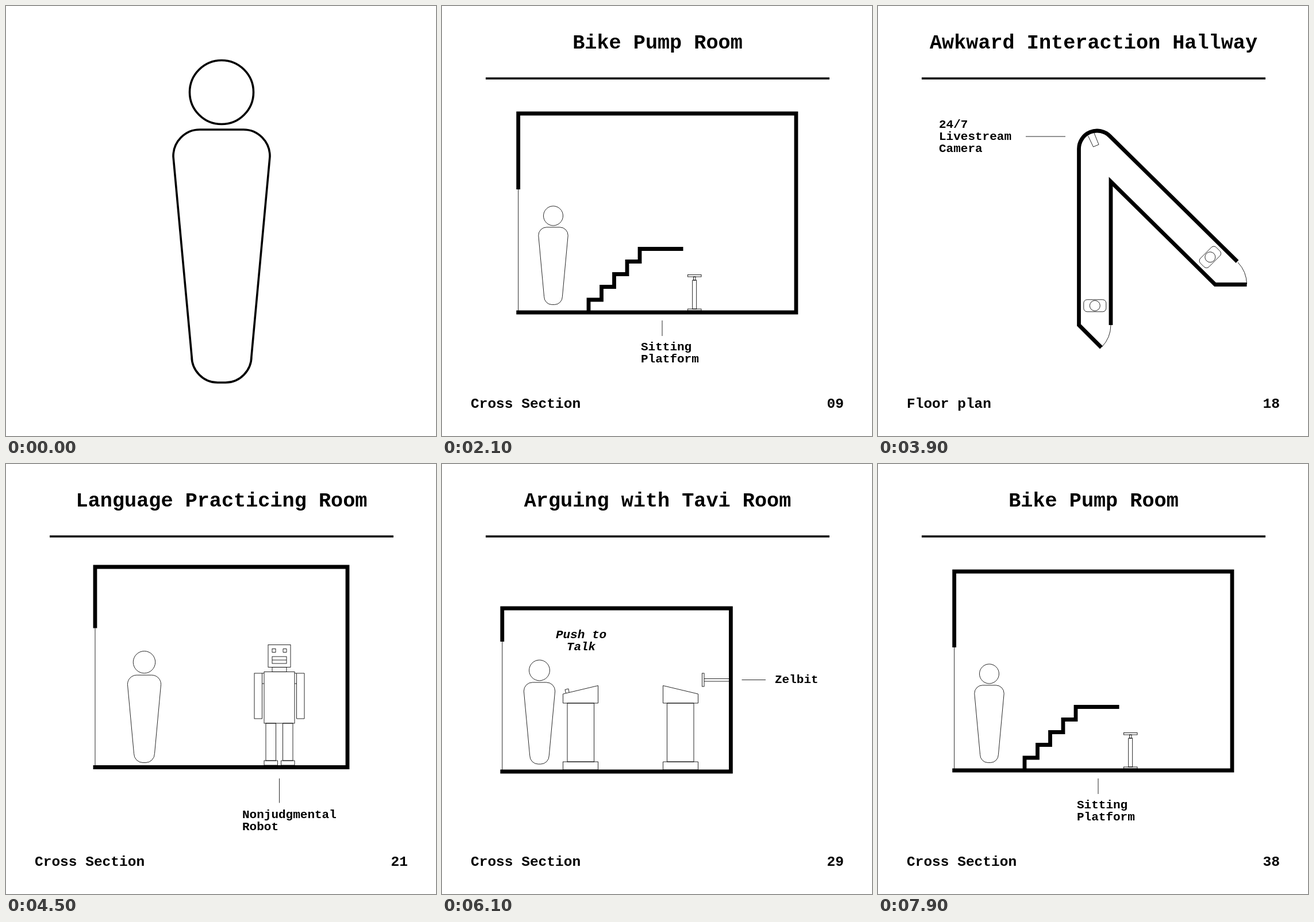
An HTML page for the animation above (8000 ms loop, 748 by 748 pixels).

```html
<!DOCTYPE html>
<html lang="en">
<head>
<meta charset="utf-8">
<title>Rooms</title>
<style>
  html, body { margin: 0; width: 100%; height: 100%; overflow: hidden; background: #fff; }
  svg { display: block; width: 100%; height: 100%; }
  text { font: bold 21px "Courier New", "Liberation Mono", monospace; fill: #000; white-space: pre; }
  .title { font-size: 35.2px; text-anchor: middle; }
  .foot { font-size: 24.5px; }
  .spoken text { font-style: italic; text-anchor: middle; }
  .thin, .wall, .bold { fill: none; stroke: #000; }
  .thin { stroke-width: 0.85; }
  .wall { stroke-width: 6.8; }
  .bold { stroke-width: 3.6; }
  .thin *, .bold * { vector-effect: non-scaling-stroke; }
  .solid { fill: #000; }
</style>
</head>
<body>
<svg id="stage" viewBox="0 0 748 748"></svg>
<script>
const thin = (d) => `<path class="thin" d="${d}"/>`;
const wall = (d) => `<path class="wall" d="${d}"/>`;
const group = (transform, body) => `<g class="thin" transform="${transform}">${body}</g>`;
const box = (l, t, r, b, round = 0) =>
  `<rect class="thin" x="${l}" y="${t}" width="${r - l}" height="${b - t}" rx="${round}"/>`;
const ring = (x, y, r) => `<circle class="thin" cx="${x}" cy="${y}" r="${r}"/>`;
const label = (x, y, ...lines) =>
  lines.map((line, i) => `<text x="${x}" y="${y + i * 21}">${line}</text>`).join('');

const FIGURE = '<circle cx="375" cy="150" r="55.5"/>' +
  '<path d="M337 215H413A46 46.5 0 0 1 459 262L427 609A45 46 0 0 1 382 655H368' +
  'A45 46 0 0 1 323 609L291 262A46 46.5 0 0 1 337 215Z"/>';

function person(x, top, bottom) {
  const scale = (bottom - top) / 560.5;
  return group(`translate(${x} ${top}) scale(${scale}) translate(-375 -94.5)`, FIGURE);
}

// Wall centre lines, with the doorway below `door` on the left side
function room(l, t, r, b, door) {
  return wall(`M${l} ${door}V${t}H${r}V${b}H${l - 3.4}`) + thin(`M${l} ${door}V${b}`);
}

function hallway() {
  const walker = box(-19.5, -10.5, 19.5, 10.5, 6) + ring(0, 0, 9);
  return thin('M365.5 226L374.5 245L384 241L376 221') +
    wall('M388.5 594L349.5 555V249A31.5 31.5 0 0 1 403.5 226.5L625 444.5') +
    wall('M405 555V305.5L586.5 484.5H641.5') +
    thin('M405 555A56 56 0 0 1 389.5 593M626 446A56 56 0 0 1 641.5 484') +
    group('translate(377.3 521.3)', walker) +
    group('translate(577.8 436.8) rotate(-45)', walker) +
    label(106, 212, '24/7', 'Livestream', 'Camera') + thin('M257 227H326');
}

function debate() {
  const podium = thin('M210.5 400L271.5 385.5V416H210.5Z') +
    box(218, 416, 264.5, 518) + box(210.5, 518, 271.5, 532);
  return podium + group('translate(656 0) scale(-1 1)', podium) +
    thin('M215.5 398.5L214 392.5L220 391L221 397') +
    box(452.5, 364, 456, 387) + thin('M456 373.5H500M456 378H500') +
    room(104.8, 251, 502.4, 535, 309) + person(169.5, 341, 522) +
    `<g class="spoken">${label(242, 303, 'Push to', 'Talk')}</g>` +
    thin('M521.5 375.5H563') + label(579, 381, 'Zelbit');
}

function language() {
  const side = box(432, 364, 445.5, 443) + thin('M445.5 364H449M445.5 382H449') +
    box(452, 451, 469.5, 516) + box(449, 516, 472.5, 524) + box(463, 321.5, 469, 327.5);
  return side + group('translate(951 0) scale(-1 1)', side) +
    box(456, 314.5, 495, 353.5) + box(463, 335, 488, 347) + thin('M463 341H488') +
    box(463, 353.5, 488, 361.5) + box(449, 361.5, 502, 451) +
    room(155, 179, 594, 527.5, 285.5) + person(240.5, 325.5, 519.5) +
    thin('M475.5 547V589.5') + label(411, 616, 'Nonjudgmental', 'Robot');
}

function cycling() {
  const lamp = box(-7.5, -7.5, 7.5, 7.5) + thin('M0 7.5V21.5M7.5 -3.5L13 6H7.5');
  const lamps = [0, 1, 2].map(i =>
    group(`translate(${267.5 + i * 119.2} 304.5)`, lamp) +
    group(`translate(${321.5 + i * 119.2} 368.5) rotate(180)`, lamp)).join('');
  const rollers = [233, 280.5, 384].map(x =>
    `<circle class="solid" cx="${x}" cy="530.5" r="8.6"/><circle cx="${x}" cy="530.5" r="2" fill="#fff"/>`).join('');
  return lamps + box(243, 326, 584, 347, 10.5) +
    ring(256, 503, 27.6) + ring(360, 503, 27.6) +
    thin('M256 503L283.5 454H338L310.5 507ZM310.5 507L276 438M271.5 438H288') +
    thin('M360 503L337 452M338 454L344 446.5C349 446 351 449 350.5 453C350 458 346 460 343 459') +
    thin('M280.5 528H384M280.5 532.5H384') +
    room(94, 279, 656, 541.5, 367) + rollers + person(144, 390, 530.5) +
    thin('M411 237V263M300 558V585') +
    label(362, 181, 'Ignorable', 'Red Light', 'Track') + label(257, 614, 'Rollers');
}

function snack() {
  const bowl = thin('M349 418H394.5C394 427 391 434 386.5 438.5H357C352 434 349.5 427 349 418Z');
  return bowl + group('translate(52.8 0)', bowl) +
    room(185.7, 190.5, 537, 531.5, 295) + wall('M348 531V441.5H447V531') +
    person(269.5, 334, 523.5) + thin('M371 548V576M424.5 548V576') +
    label(296, 602, 'Bowl of', 'Zandoos') + label(415, 602, 'Bowl of', 'Water');
}

function pump() {
  return box(427.5, 467.5, 451, 471) + box(437.5, 471, 441, 477) +
    box(435.7, 477, 442.7, 527) + box(427.5, 527, 451, 530) +
    room(132.7, 187, 616, 533, 319) + person(193.5, 348, 519.5) +
    wall('M255 530V511H277.5V488.5H299.5V466.5H322V444.5H344V422.5H419.5') +
    thin('M383 547V574') + label(346, 599, 'Sitting', 'Platform');
}

const ROOMS = [
  ['Awkward Interaction Hallway', 'Floor plan', hallway()],
  ['Arguing with Tavi Room', 'Cross Section', debate()],
  ['Language Practicing Room', 'Cross Section', language()],
  ['Manhattan Cycling Room', 'Cross Section', cycling()],
  ['Zandoos Room', 'Cross Section', snack()],
  ['Bike Pump Room', 'Cross Section', pump()]
];

// Room shown on each numbered page
const ORDER = '3450' + '1234502341' + '3450312' + '4503' + '45012534' + '01235';
const LOOP = 8000, COVER = 500, HOLD = 200;

function page(number) {
  if (number === 0) return `<g class="bold">${FIGURE}</g>`;
  const [title, view, drawing] = ROOMS[ORDER[number - 1]];
  return `<text class="title" x="375" y="73.5">${title}</text>
    <path class="bold" d="M76 126H674"/>${drawing}
    <text class="foot" x="50" y="699">${view}</text>
    <text class="foot" x="699" y="699" text-anchor="end">${String(number).padStart(2, '0')}</text>`;
}

const stage = document.getElementById('stage');
const start = performance.now();
let shown = -1;

function tick() {
  const time = (performance.now() - start) % LOOP;
  const number = time < COVER ? 0 : Math.floor((time - COVER) / HOLD) + 1;
  if (number !== shown) stage.innerHTML = page(shown = number);
  requestAnimationFrame(tick);
}
tick();
</script>
</body>
</html>
```
